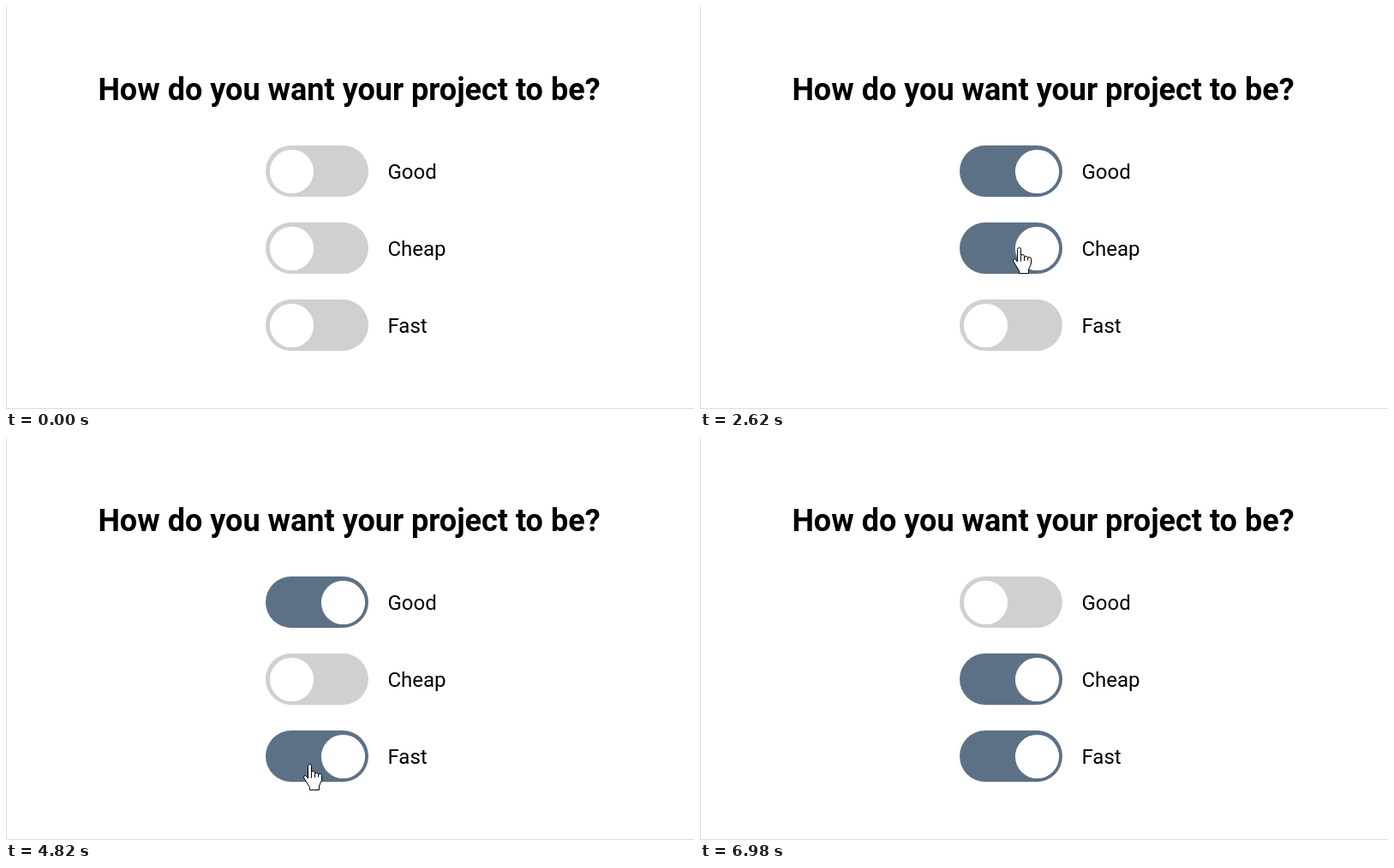
Recreate the animation shown at these times as an HTML page with a canvas. Size 803 by 471 pixels, loop 7010 ms.

```html
<!DOCTYPE html>
<html lang="en">
<head>
<meta charset="utf-8">
<title>Project toggles</title>
<style>
  html, body { margin: 0; width: 100%; height: 100%; overflow: hidden; background: #fff; }
  canvas { display: block; }
</style>
</head>
<body>
<canvas id="stage" width="803" height="471"></canvas>
<script>
const ctx = document.getElementById('stage').getContext('2d');
const LOOP = 7010;
const SLIDE = 320;
const TRACK = { x: 303, w: 120, h: 60 };
const ON = '#5d7186', OFF = '#d0d0d0';

// Each click flips its toggle; all start off.
const toggles = [
  { label: 'Good', y: 163, clicks: [1265, 5375] },
  { label: 'Cheap', y: 253, clicks: [2288, 3852, 5367] },
  { label: 'Fast', y: 343, clicks: [4500] }
];

// The pointer rests at each stop until the next move begins.
const ENTRY = { x: 725, y: 473 };
const moves = [
  { from: 230, to: 930, x: 371, y: 212 },
  { from: 1030, to: 1200, x: 362, y: 203 },
  { from: 1580, to: 1690, x: 371, y: 282 },
  { from: 3010, to: 3050, x: 373, y: 295 },
  { from: 3200, to: 3400, x: 377, y: 355 },
  { from: 3420, to: 3610, x: 375, y: 283 },
  { from: 4110, to: 4360, x: 353, y: 382 },
  { from: 4830, to: 5260, x: 352, y: 297 },
  { from: 6240, to: 6800, x: 775, y: 480 }
];

const PALM = new Path2D('M5.5 17L2.5 13.5Q.5 13.5 .5 16L7.5 27.5V30.5H18.5V26L21.5 19V15');
const ARROW = new Path2D('M.5 .5V24.5L6 19L9.5 27.5L13 26L9.5 18H17Z');

const clamp = v => Math.max(0, Math.min(1, v));
const ease = k => k * k * (3 - 2 * k);

function pointerAt(t) {
  let { x, y } = ENTRY;
  for (const move of moves) {
    if (t < move.from) break;
    const k = ease(clamp((t - move.from) / (move.to - move.from)));
    const dx = move.x - x;
    // Sideways moves bow upwards.
    const lift = 0.2 * Math.abs(dx) * Math.sin(Math.PI * k);
    x += dx * k;
    y += (move.y - y) * k - lift;
  }
  return { x: Math.round(x), y: Math.round(y) };
}

function drawToggle({ label, y, clicks }, t) {
  const past = clicks.filter(c => c <= t);
  const on = past.length % 2 === 1;
  const k = past.length ? clamp((t - past.at(-1)) / SLIDE) : 1;
  const shift = on ? k : 1 - k;
  const scale = 1 + 0.2 * (1 - Math.abs(2 * k - 1));

  ctx.fillStyle = on ? ON : OFF;
  ctx.beginPath();
  ctx.roundRect(TRACK.x, y, TRACK.w, TRACK.h, TRACK.h / 2);
  ctx.fill();

  ctx.fillStyle = '#fff';
  ctx.beginPath();
  ctx.arc(TRACK.x + 30.5 + 60 * shift, y + 30.5, 25.6 * scale, 0, 2 * Math.PI);
  ctx.fill();

  ctx.fillStyle = '#000';
  ctx.font = '24px Roboto, sans-serif';
  ctx.textAlign = 'left';
  ctx.fillText(label, 445.5, y + 39);
}

function drawHand() {
  for (let i = 0; i < 4; i++) {
    const top = i ? Math.round(7 + 1.4 * i) + 0.5 : 0.5;
    ctx.beginPath();
    ctx.roundRect(5.5 + 4 * i, top, 4, 18 - top, [2, 2, 0, 0]);
    ctx.fill();
    ctx.stroke();
  }
  ctx.fill(PALM);
  ctx.stroke(PALM);
}

function drawArrow() {
  ctx.fill(ARROW);
  ctx.stroke(ARROW);
}

function drawPointer(t) {
  const { x, y } = pointerAt(t);
  const over = x >= TRACK.x && x < TRACK.x + TRACK.w &&
    toggles.some(s => y >= s.y && y < s.y + TRACK.h);
  ctx.save();
  ctx.translate(over ? x - 6 : x, y);
  ctx.fillStyle = '#fff';
  ctx.strokeStyle = '#000';
  ctx.lineWidth = 1;
  ctx.lineJoin = 'round';
  if (over) drawHand();
  else drawArrow();
  ctx.restore();
}

function draw(t) {
  ctx.fillStyle = '#fff';
  ctx.fillRect(0, 0, 803, 471);
  ctx.fillStyle = '#dedede';
  ctx.fillRect(0, 0, 1, 471);
  ctx.fillRect(0, 470, 803, 1);

  ctx.fillStyle = '#000';
  ctx.font = 'bold 36px Roboto, sans-serif';
  ctx.textAlign = 'center';
  ctx.fillText('How do you want your project to be?', 400.5, 110);

  toggles.forEach(s => drawToggle(s, t));
  drawPointer(t);
}

const start = performance.now();
function frame() {
  draw((performance.now() - start) % LOOP);
  requestAnimationFrame(frame);
}
frame();
</script>
</body>
</html>
```
